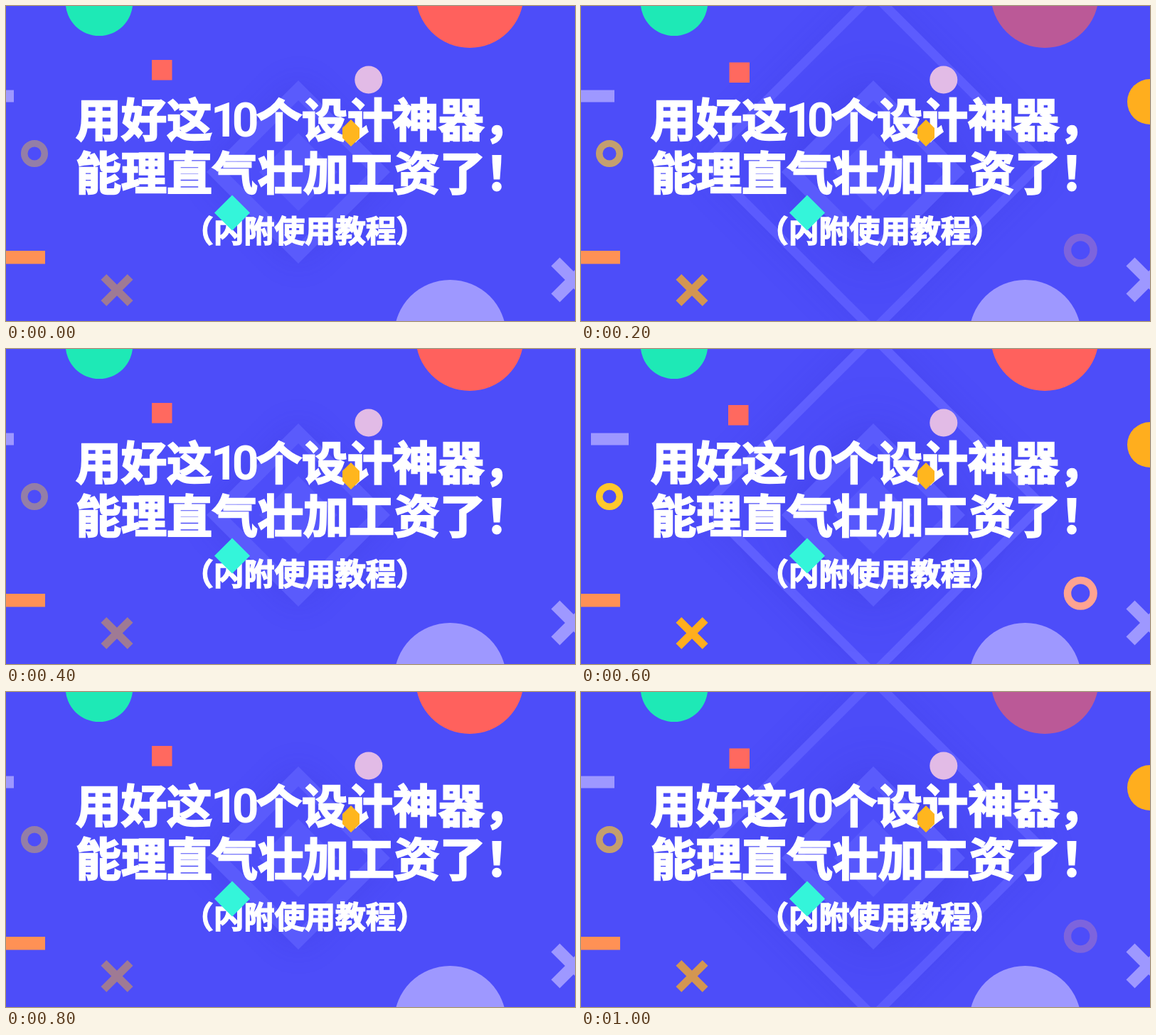
An HTML page with a canvas for the animation above (1200 ms loop, 800 px wide and 444 px high).

```html
<!DOCTYPE html>
<html lang="zh-CN">
<head>
<meta charset="utf-8">
<style>
html, body { margin: 0; width: 100%; height: 100%; overflow: hidden; background: #4d4df9; }
canvas { display: block; width: 100vw; height: 100vh; }
</style>
</head>
<body>
<canvas id="stage" width="800" height="444"></canvas>
<script>
const ctx = document.getElementById('stage').getContext('2d');
const CJK = '"Noto Sans CJK SC", "Noto Sans CJK", sans-serif';
const BLUE = '#4d4df9', LILAC = '#9e98ff', AMBER = '#ffae1e';
const STEP = 200;

// Three poses of the flickering decorations
const dim = { coral: 1, bar: [-42, 53], square: [205, 76], ring: .4, cross: .46, sun: 0, halo: 0, glow: 0 };
const mid = { coral: .62, bar: [-6, 53], square: [208.5, 79.5], ring: .67, cross: .76, sun: 1, halo: .27, glow: .85 };
const full = { coral: 1, bar: [14, 53], square: [207, 79], ring: 1, cross: 1, sun: 1, halo: 1, glow: 1 };
const order = [dim, mid, dim, full, dim, mid];

function withAlpha(alpha, draw) {
  if (!alpha) return;
  ctx.save();
  ctx.globalAlpha = alpha;
  draw();
  ctx.restore();
}

function disc(x, y, r, color) {
  ctx.fillStyle = color;
  ctx.beginPath();
  ctx.arc(x, y, r, 0, Math.PI * 2);
  ctx.fill();
}

function ring(x, y, r, width, color) {
  ctx.strokeStyle = color;
  ctx.lineWidth = width;
  ctx.beginPath();
  ctx.arc(x, y, r, 0, Math.PI * 2);
  ctx.stroke();
}

function rect(x, y, w, h, color) {
  ctx.fillStyle = color;
  ctx.fillRect(x, y, w, h);
}

function diamondPath(x, y, r) {
  ctx.moveTo(x, y - r);
  ctx.lineTo(x + r, y);
  ctx.lineTo(x, y + r);
  ctx.lineTo(x - r, y);
  ctx.closePath();
}

function diamond(x, y, outer, inner, color) {
  ctx.fillStyle = color;
  ctx.beginPath();
  diamondPath(x, y, outer);
  if (inner) diamondPath(x, y, inner);
  ctx.fill('evenodd');
}

// Soft dark halo around a diamond
function shade(x, y, r, blur, alpha) {
  ctx.save();
  ctx.shadowColor = `rgba(48, 44, 205, ${alpha})`;
  ctx.shadowBlur = blur;
  diamond(x, y, r, 0, BLUE);
  ctx.restore();
}

function cross(x, y, half, width, color) {
  ctx.save();
  ctx.translate(x, y);
  ctx.rotate(Math.PI / 4);
  ctx.fillStyle = color;
  const arm = half * Math.SQRT2 - width / 2;
  ctx.beginPath();
  ctx.rect(-arm, -width / 2, arm * 2, width);
  ctx.rect(-width / 2, -arm, width, arm * 2);
  ctx.fill();
  ctx.restore();
}

function text(str, x, y, size) {
  ctx.font = `900 ${size}px ${CJK}`;
  ctx.letterSpacing = '0px';
  ctx.fillStyle = ctx.strokeStyle = '#fff';
  ctx.lineWidth = size / 27;
  ctx.fillText(str, x, y);
  ctx.strokeText(str, x, y);
}

function digits(str, x, y) {
  ctx.font = '700 66px Roboto, sans-serif';
  ctx.letterSpacing = '-8px';
  ctx.fillStyle = '#fff';
  ctx.fillText(str, x, y);
}

function backdrop(glow) {
  rect(0, 0, 800, 444, BLUE);
  withAlpha(glow, () => {
    shade(411, 220, 246, 50, .18);
    diamond(411, 220, 246, 228, '#6060ff');
  });
  shade(411, 234, 129, 45 + 30 * glow, .22 + .12 * glow);
  diamond(411, 234, 129, 101, '#5a5bfc');
  diamond(411, 234, 55, 0, '#5758fc');
}

function title() {
  text('用好这', 98, 184, 64);
  digits('10', 288, 184);
  text('个设计神器，', 352, 184, 64);
  text('能理直气壮加工资了！', 98, 259, 64);
  text('（内附使用教程）', 249, 333, 42.8);
}

function render(p) {
  backdrop(p.glow);

  disc(131, -5.3, 47.3, '#1ee9b6');
  withAlpha(p.coral, () => disc(652, -16.9, 75.9, '#ff615d'));
  disc(624.5, 464.8, 78.8, LILAC);
  disc(509.8, 104, 19.5, '#e2bbe6');
  rect(p.square[0], p.square[1], 28.5, 28.5, '#ff695f');
  rect(p.bar[0], 118.5, p.bar[1], 17, LILAC);
  rect(0, 345, 55, 18.5, '#ff9155');
  withAlpha(p.ring, () => ring(40, 208, 14.3, 9.5, '#ffc82c'));
  withAlpha(p.cross, () => cross(156, 400.5, 22.5, 11, AMBER));
  withAlpha(p.sun, () => disc(800, 135, 32, AMBER));
  withAlpha(p.halo, () => ring(702.3, 344.3, 18.3, 10.5, '#ffa391'));
  cross(798, 386, 31.5, 17, LILAC);

  title();

  ctx.save();
  ctx.beginPath();
  ctx.rect(473, 158, 24, 42);
  ctx.clip();
  diamond(485, 179, 19, 0, '#ffb61e');
  ctx.restore();
  diamond(318, 291.5, 25, 0, '#34f5da');
}

function tick() {
  const i = Math.floor(performance.now() / STEP) % order.length;
  render(order[i]);
  requestAnimationFrame(tick);
}
tick();
</script>
</body>
</html>
```
